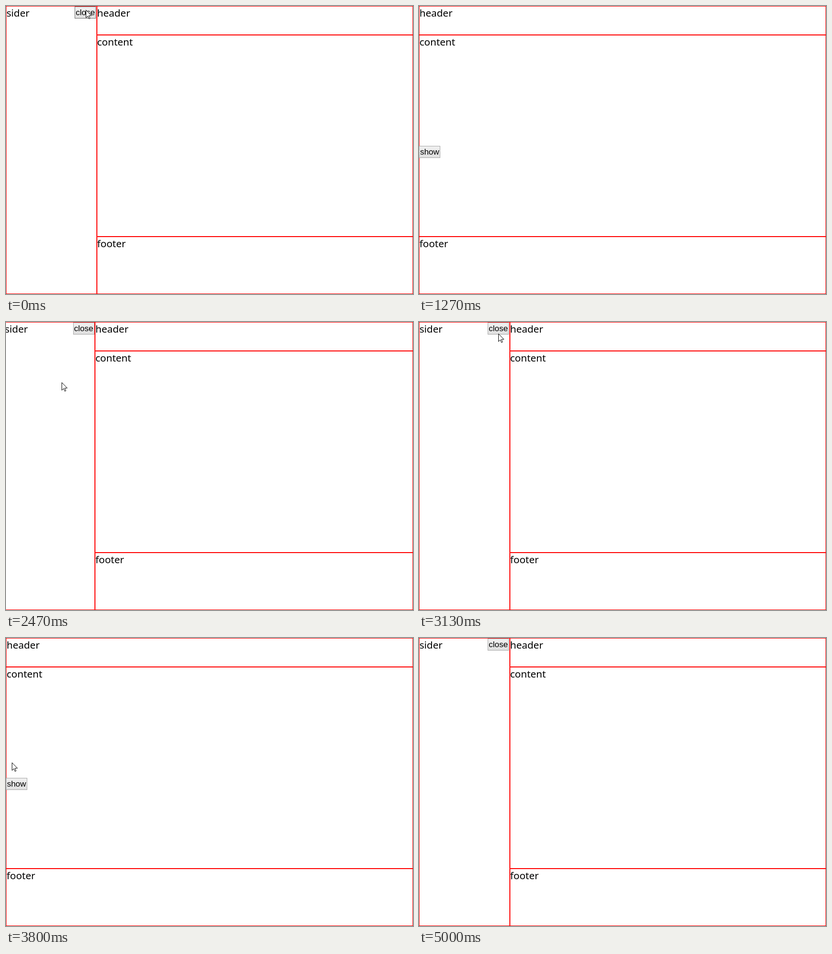
Write an HTML page that moves like this. It is 842 px wide and 597 px high and loops after 5.54 s.

```html
<!DOCTYPE html>
<html lang="en">
<head>
<meta charset="utf-8">
<title>Collapsible sider</title>
<style>
  html, body { margin: 0; width: 100%; height: 100%; overflow: hidden; background: #fff; }
  #stage { position: relative; width: 842px; height: 597px; overflow: hidden; }
  #stage * { position: absolute; box-sizing: border-box; white-space: nowrap; }
  .box { border: 1px solid #f00; font: 20.5px/26px "Noto Sans", "Open Sans", sans-serif; color: #000; }
  #sider { top: 0; left: 0; width: 187.5px; height: 597px; }
  #main { top: 0; right: 0; height: 597px; }
  #main .box { left: 0; width: 100%; }
  .btn {
    width: 44px; height: 25px; border: 1px solid #a6a6a6; text-align: center;
    background: linear-gradient(#f0f0f0, #e0e0e0);
    font: 17px/23px "Liberation Sans", Arial, sans-serif;
  }
  .btn.hover { border-color: #707070; }
  #close { top: 0; right: .4px; }
  #show { top: 290px; left: 0; }
  #cursor { left: 0; top: 0; width: 13px; height: 20px; }
</style>
</head>
<body>
<div id="stage">
  <div id="sider" class="box">sider<div id="close" class="btn">close</div></div>
  <div id="main">
    <div class="box" style="top:0;height:60px">header</div>
    <div class="box" style="top:60px;height:418px">content</div>
    <div class="box" style="top:478px;height:119px">footer</div>
  </div>
  <div id="show" class="btn">show</div>
  <svg id="cursor" viewBox="0 0 13 20">
    <path d="M.5 .5V16.5L4.2 13L6.6 18.6L8.9 17.6L6.5 12H11.7Z" fill="#fff" stroke="#000"/>
  </svg>
</div>
<script>
const LOOP = 5540, FPS = 15, SLIDE = 500, WIDTH = 187.5;
const clicks = [525, 2055, 3325, 4433]; // close, show, close, show

// Pointer moves: start, end, x, y
const moves = [
  [533, 1067, 38, 175], [1067, 1250, 40, 211], [1300, 1400, 27, 309],
  [2070, 3130, 164, 24],
  [3333, 3800, 12, 258], [3800, 4200, 17, 310], [4533, 4990, 60, 597]
];

const $ = id => document.getElementById(id);
const sider = $('sider'), main = $('main'), show = $('show'), cursor = $('cursor');
const buttons = [$('close'), show];

const lerp = (a, b, k) => a + (b - a) * k;
const bezier = (a, b, u) => 3 * a * u * (1 - u) ** 2 + 3 * b * u * u * (1 - u) + u ** 3;

// The CSS "ease" curve
function ease(p) {
  if (p <= 0) return 0;
  if (p >= 1) return 1;
  let lo = 0, hi = 1;
  for (let i = 0; i < 24; i++) {
    const mid = (lo + hi) / 2;
    if (bezier(.25, .25, mid) < p) lo = mid; else hi = mid;
  }
  return bezier(.1, 1, lo);
}

function pointer(t) {
  let x = 165, y = 8;
  for (const [start, end, toX, toY] of moves) {
    const k = ease((t - start) / (end - start));
    x = lerp(x, toX, k);
    y = lerp(y, toY, k);
  }
  return [Math.round(x), Math.round(y)];
}

function draw(t) {
  const edge = WIDTH * clicks.reduce((open, start, i) => lerp(open, i % 2, ease((t - start) / SLIDE)), 1);
  sider.style.left = edge - WIDTH + 'px';
  main.style.left = edge + 'px';
  show.style.left = -edge + 'px';

  const [x, y] = pointer(t);
  const visible = t < 1260 || t > 1460;
  cursor.style.visibility = visible ? 'visible' : 'hidden';
  cursor.style.transform = `translate(${x}px, ${y}px)`;
  for (const btn of buttons) {
    const r = btn.getBoundingClientRect();
    btn.classList.toggle('hover', visible && x >= r.left && x < r.right && y >= r.top && y < r.bottom - 2);
  }
}

// Hold each picture for one step of a 15 fps clock, rounded to 10 ms
function tick() {
  const t = Math.floor(performance.now() % LOOP / 10) * 10;
  draw(Math.floor((t + 3.34) * FPS / 1000) * 1000 / FPS);
  requestAnimationFrame(tick);
}
tick();
</script>
</body>
</html>
```
